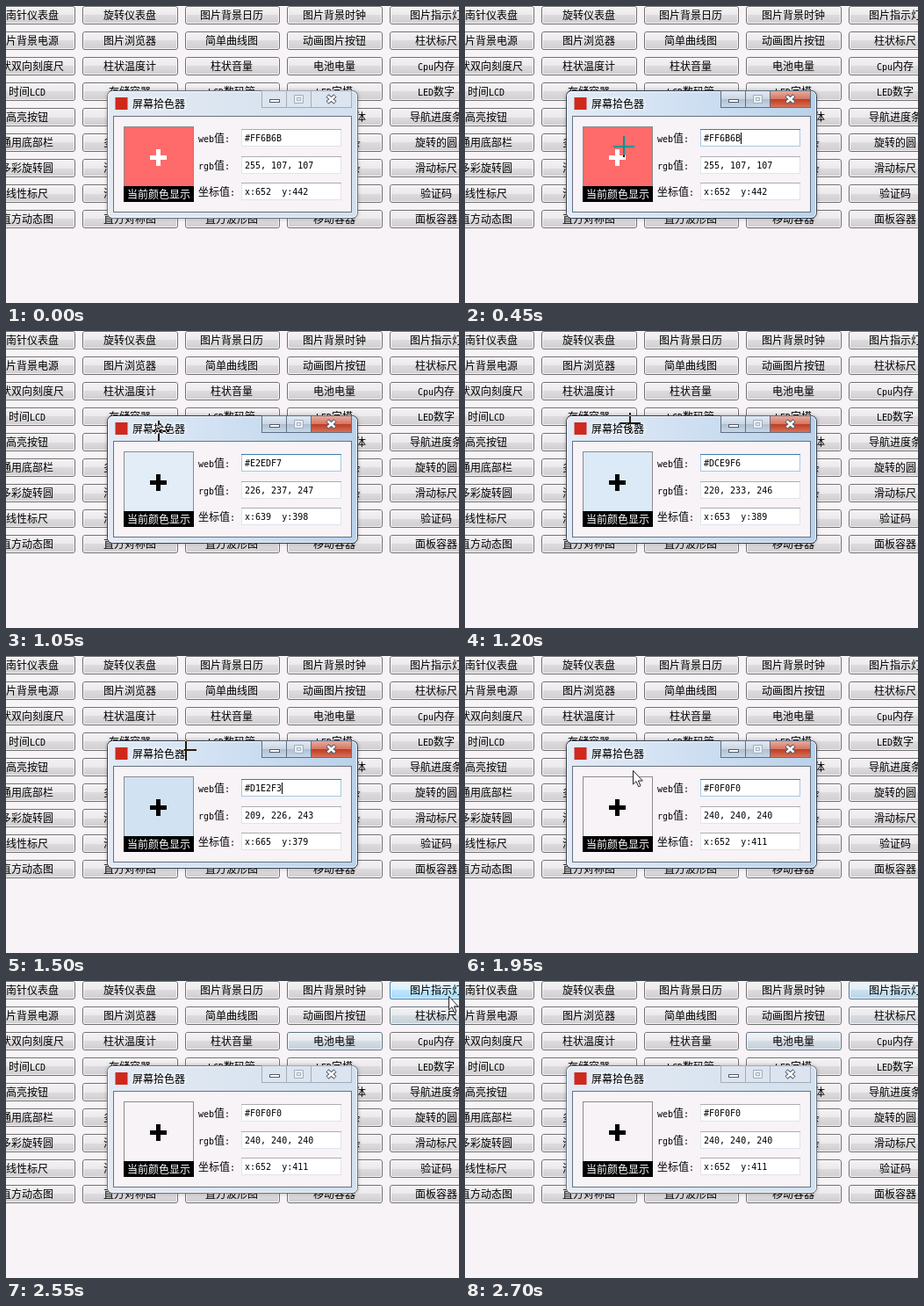
Recreate the animation shown at these times as an HTML page. Size 516x338 px, loop 2.85 s.

```html
<!DOCTYPE html>
<html lang="zh">
<head>
<meta charset="utf-8">
<style>
html, body { margin: 0; width: 100%; height: 100%; overflow: hidden; background: #f7f3f7; }
svg { display: block; width: 516px; height: 338px; }
text { font: 12px "Noto Sans CJK SC", "Noto Sans CJK", sans-serif; white-space: pre; }
.ascii { font: 10px "DejaVu Sans Mono", monospace; }
.mid { text-anchor: middle; }
#win { filter: drop-shadow(0 0 2px #0004); }
#cross { fill: #fff; mix-blend-mode: difference; }
</style>
</head>
<body>
<svg id="stage" viewBox="0 0 516 338"></svg>
<script>
const rows = [
  '指南针仪表盘 旋转仪表盘 图片背景日历 图片背景时钟 图片指示灯',
  '图片背景电源 图片浏览器 简单曲线图 动画图片按钮 柱状标尺',
  '柱状双向刻度尺 柱状温度计 柱状音量 电池电量 Cpu内存',
  '时间LCD 存储容器 LCD数码管 LED字模 LED数字',
  '高亮按钮 渐变按钮 开关按钮 圆形数码字体 导航进度条',
  '通用底部栏 多彩底部栏 导航按钮 圆形进度条 旋转的圆',
  '多彩旋转圆 滑动进度条 滑动按钮 圆环进度条 滑动标尺',
  '线性标尺 滑动选择尺 数值标尺 水波容器 验证码',
  '直方动态图 直方对称图 直方波形图 移动容器 面板容器'
].map(r => r.split(' '));

const STEP = 150, COUNT = 19;
// step, picked colour, screen x, screen y
const picks = [
  [0, 'FF6B6B', 652, 442], [5, 'FF6B6B', 645, 427], [6, 'F0F0F0', 641, 412],
  [7, 'E2EDF7', 639, 398], [8, 'DCE9F6', 653, 389], [9, 'D1E2F3', 665, 379],
  [11, 'D8E6F5', 669, 391], [12, 'F0F0F0', 663, 402], [13, 'F0F0F0', 652, 411]
];
// crosshair centre for steps 2 to 12
const crossPath = [[181, 160], [181, 160], [181, 155], [180, 143], [177, 128], [174, 114],
  [188, 105], [200, 97], [205, 107], [198, 118], [190, 127]];
const arrowAt = { 1: [215, 152], 13: [191, 130], 14: [425, 61], 15: [495, 15], 16: [500, 14], 17: [504, 17] };
// first step and strength of each fading button highlight
const glows = {
  '电池电量': [14, .8, .4, .35, .3, .25],
  '柱状标尺': [15, .3, .25, .2, .1],
  '图片指示灯': [15, .1, .8, 1, .6]
};

const runs = s => s.replace(/[ -~]+/g, m => `<tspan class="ascii">${m}</tspan>`);
const text = (x, cy, s, more = '') => `<text x="${x}" y="${cy + 4.5}" ${more}>${runs(s)}</text>`;
const rect = (x, y, w, h, fill, more = '') =>
  `<rect x="${x}" y="${y}" width="${w}" height="${h}" fill="${fill}" ${more}/>`;
const grad = (id, stops, down = 1) =>
  `<linearGradient id="${id}" x2="${1 - down}" y2="${down}">` +
  stops.map(([at, c]) => `<stop offset="${at}" stop-color="${c}"/>`).join('') + '</linearGradient>';

function button(label, col, row) {
  const left = -29.5 + 116.5 * col, y = row * 29 + .5;
  const x = Math.ceil(left) + .5, w = Math.floor(left + 108) + .5 - x;
  const face = (fill, edge) => rect(x, y, w, 20, fill, `rx="2.5" stroke="${edge}"`) +
    rect(x + 1, y + 1, w - 2, 18, 'none', 'rx="1.5" stroke="#fff" stroke-opacity=".75"');
  const glow = glows[label] ? `<g id="${label}" opacity="0">${face('url(#hot)', '#3c7fb1')}</g>` : '';
  return face('url(#btn)', '#707070') + glow + text(Math.floor(left + 54), y + 10, label, 'class="mid"');
}

function frame(id, fill, edge, caption, close, line) {
  const box = (x, w, c) => rect(x + .5, 96.5, w, 19, c, `stroke="${line}"`);
  return `<g id="${id}">` +
    rect(115.5, 96.5, 285, 145, fill, `rx="6" stroke="${edge}"`) +
    rect(116.5, 97.5, 283, 143, 'none', 'rx="5" stroke="#fff" stroke-opacity=".7"') +
    box(291, 28, caption) + box(319, 28, caption) + box(347, 46, close) + '</g>';
}

function field(id, label, cy) {
  return text(219, cy, label) +
    rect(268.5, cy - 9.5, 113, 19, '#fff', 'stroke="#e2e3ea"') +
    `<path d="M268 ${cy - 9.5}h114" stroke="#abadb3"/>` +
    (id == 'web' ? `<g id="focus">${rect(268.5, cy - 9.5, 113, 19, 'none', 'stroke="#a4c9e3"')}` +
      `<path d="M268 ${cy - 9.5}h114" stroke="#3d7bad"/></g>` : '') +
    `<text id="${id}" class="ascii" x="272" y="${cy + 4}"></text>`;
}

stage.innerHTML = '<defs>' +
  grad('btn', [[0, '#f4f2f4'], [.5, '#ebe9eb'], [.5, '#dddbdd'], [1, '#cfcdcf']]) +
  grad('hot', [[0, '#eaf6fd'], [.5, '#d9f0fc'], [.5, '#bee6fd'], [1, '#a7d9f5']]) +
  grad('on', [[0, '#e2ebf6'], [.4, '#d3e2f3'], [1, '#b9d1ea']], 0) +
  grad('off', [[0, '#e3eaf3'], [1, '#d3e0ee']], 0) +
  grad('cap', [[0, '#e4ebf3'], [.48, '#cbd6e4'], [.5, '#aebfd2'], [1, '#c8d9ea']]) +
  grad('red', [[0, '#e9ada0'], [.48, '#d57763'], [.5, '#bd3a22'], [1, '#d9755a']]) +
  '</defs>' + rect(0, 0, 516, 338, '#f7f3f7') +
  rows.map((r, j) => r.map((s, i) => button(s, i, j)).join('')).join('') +
  '<g id="win">' +
  frame('idle', 'url(#off)', '#6d7681', '#dce5ef', '#dce5ef', '#a3adb9') +
  frame('active', 'url(#on)', '#38424e', 'url(#cap)', 'url(#red)', '#5d6f83') + '</g>' +
  rect(300.5, 106.5, 11, 3, '#fff', 'stroke="#535a68"') +
  '<path d="M328.500 101.500h10v9h-10zM331.500 104.500h4v3h-4z" fill="#e8eef5" stroke="#a2aebc"/>' +
  '<path d="M366 102l9 8m0-8l-9 8" stroke="#535a68" stroke-width="4.500"/>' +
  '<path d="M366.500 102.500l8 7m0-7l-8 7" stroke="#fff" stroke-width="2.500"/>' +
  rect(124.5, 104, 14, 14, '#cf291d') +
  text(144, 111, '屏幕拾色器', 'stroke="#fff" stroke-width="4" stroke-opacity=".3" paint-order="stroke"') +
  rect(122.5, 125.5, 271, 109, '#f7f3f7', 'stroke="#66717e"') +
  rect(134.5, 137.5, 79, 85, '#f7f3f7', 'id="panel" stroke="#8c8a8c"') +
  '<path id="plus" d="M164 172.500h19M173.500 163v19" stroke-width="5"/>' +
  rect(134, 205, 80, 18, '#000') + text(174, 214, '当前颜色显示', 'class="mid" fill="#fff"') +
  field('web', 'web值:', 150) + field('rgb', 'rgb值:', 181) + field('pos', '坐标值:', 211) +
  rect(314, 144, 1, 13, '#000', 'id="caret"') +
  '<path id="cross" d="M-12-1h11v-11h2v11h11v2h-11v11h-2v-11h-11z"/>' +
  '<path id="arrow" d="M.5.5v15.500l3.500-3.300 2.700 6 2.300-1-2.700-5.700h5z" fill="#fff" stroke="#222"/>';

const el = id => document.getElementById(id);
const show = (id, on) => el(id).style.display = on ? '' : 'none';
function place(id, at) {
  show(id, at);
  if (at) el(id).setAttribute('transform', `translate(${at})`);
}

function draw(now) {
  const n = Math.floor(now % (STEP * COUNT) / STEP);
  const [, hex, x, y] = picks.filter(p => p[0] <= n).pop();
  const active = n >= 3 && n < 16;
  el('web').textContent = '#' + hex;
  el('rgb').textContent = hex.match(/../g).map(h => parseInt(h, 16)).join(', ');
  el('pos').textContent = `x:${x}  y:${y}`;
  el('panel').setAttribute('fill', hex == 'F0F0F0' ? '#f7f3f7' : '#' + hex);
  el('plus').setAttribute('stroke', hex == 'FF6B6B' ? '#fff' : '#000');
  show('active', active);
  show('idle', !active);
  show('focus', active);
  show('caret', active && n < 12 && n % 6 > 2);
  place('cross', crossPath[n - 2]);
  place('arrow', arrowAt[n]);
  for (const id in glows) {
    const [start, ...levels] = glows[id];
    el(id).setAttribute('opacity', levels[n - start] || 0);
  }
  requestAnimationFrame(draw);
}
requestAnimationFrame(draw);
</script>
</body>
</html>
```
